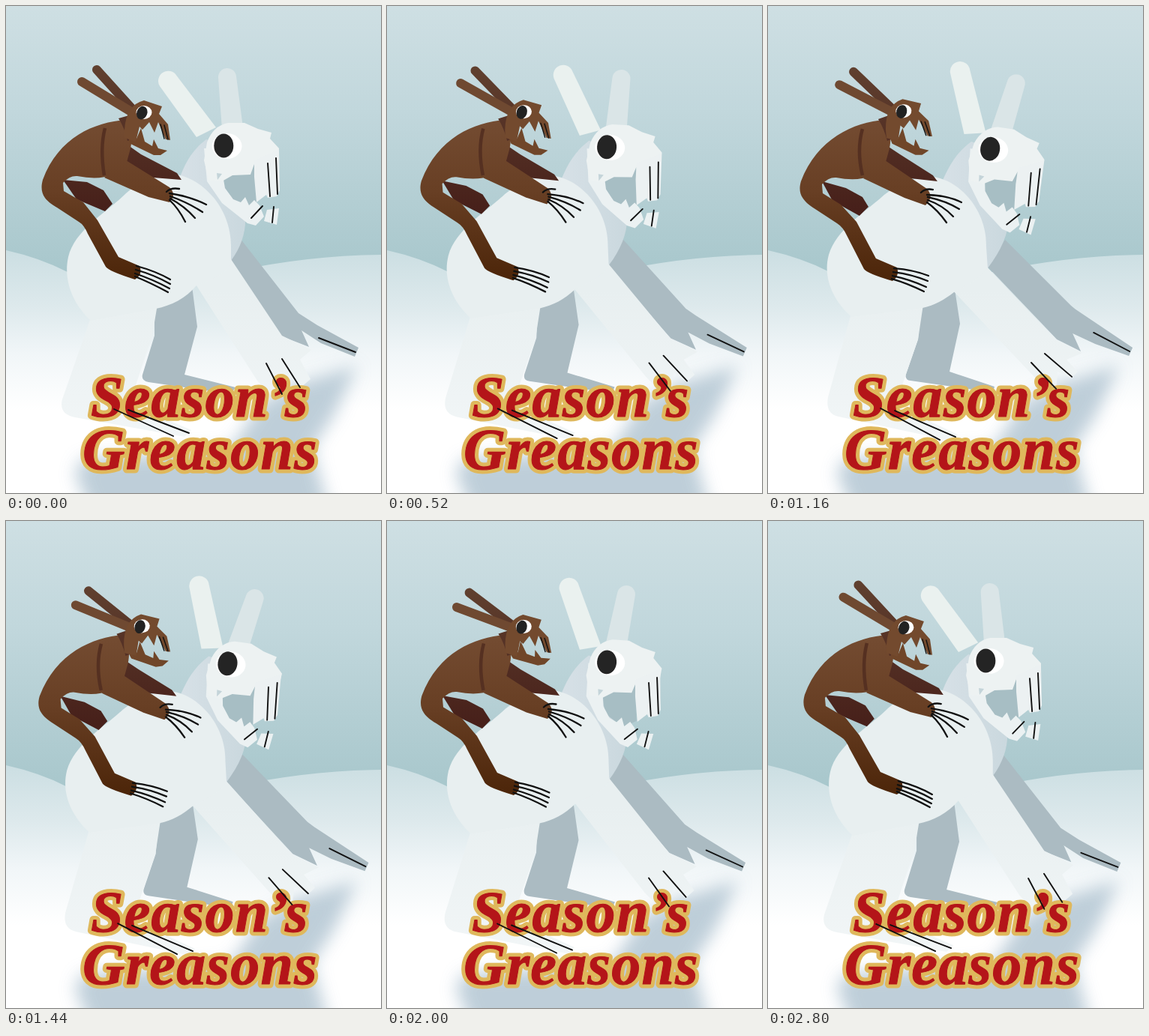
These frames come from a looping animation (500 by 650 pixels, 2840 ms). An HTML page:

```html
<!DOCTYPE html>
<html lang="en">
<head>
<meta charset="utf-8">
<title>Season's Greasons</title>
<style>
html, body { margin: 0; width: 100%; height: 100%; overflow: hidden; background: #fff; }
svg { display: block; width: 500px; height: 650px; }
.claw { fill: none; stroke: #111; stroke-width: 1.9; stroke-linecap: round; }
.fur { stroke-width: 2.3; }
text { font: italic bold 78px "Liberation Serif", serif; letter-spacing: 1.3px; stroke-linejoin: round; }
.edge { fill: #dfb85c; stroke: #dfb85c; stroke-width: 11; }
.face { fill: #b41519; stroke: #b41519; stroke-width: 1; }
</style>
</head>
<body>
<svg viewBox="0 0 500 650">
  <defs>
    <linearGradient id="sky" gradientUnits="userSpaceOnUse" x1="0" y1="0" x2="0" y2="355">
      <stop stop-color="#cedfe3"/><stop offset=".4" stop-color="#c1d7dc"/><stop offset="1" stop-color="#a8c7cc"/>
    </linearGradient>
    <linearGradient id="snow" gradientUnits="userSpaceOnUse" x1="0" y1="325" x2="0" y2="540">
      <stop stop-color="#cbdee2"/><stop offset=".35" stop-color="#dde9ec"/>
      <stop offset=".65" stop-color="#f1f6f8"/><stop offset="1" stop-color="#fff"/>
    </linearGradient>
    <linearGradient id="pelt" gradientUnits="userSpaceOnUse" x1="0" y1="380" x2="0" y2="580">
      <stop stop-color="#e8eff0"/><stop offset="1" stop-color="#f2f6f7"/>
    </linearGradient>
    <linearGradient id="neck" gradientUnits="userSpaceOnUse" x1="235" y1="0" x2="320" y2="0">
      <stop stop-color="#d6e0e6"/><stop offset="1" stop-color="#cad8de"/>
    </linearGradient>
    <linearGradient id="brown" gradientUnits="userSpaceOnUse" x1="0" y1="150" x2="0" y2="365">
      <stop stop-color="#744c32"/><stop offset=".45" stop-color="#683f24"/><stop offset="1" stop-color="#4c2509"/>
    </linearGradient>
    <linearGradient id="dark" gradientUnits="userSpaceOnUse" x1="0" y1="80" x2="0" y2="270">
      <stop stop-color="#60402f"/><stop offset="1" stop-color="#47201a"/>
    </linearGradient>
    <filter id="blur" x="-30%" y="-30%" width="160%" height="160%"><feGaussianBlur stdDeviation="11"/></filter>
  </defs>

  <rect width="500" height="650" fill="url(#sky)"/>
  <path fill="url(#snow)" d="M0 326Q45 336 82 355H300Q400 333 500 332V650H0Z"/>
  <path fill="#b3c6d3" opacity=".85" filter="url(#blur)"
    d="M385 505L468 480L438 545L408 590L435 690H120L92 625L100 605L300 590L340 530Z"/>

  <g id="back"></g>
  <g id="head">
    <g id="farEar"><path fill="#dae5e7" d="M283 96A12 12 0 0 1 307 94L316 162L288 164Z"/></g>
    <g id="nearEar"><path fill="#eaf1ef" d="M205 107A12.8 12.8 0 0 1 227.5 93L280 162L254 175Z"/></g>
    <path fill="#a7bec4" d="M286 222L331 210L335 262L318 272L292 255Z"/>
  </g>
  <g id="jaw">
    <path fill="#ebf1f2" d="M264 190L268 234L288 263L322 290L333 293L344 281L338 266L331 259L324 266L319 255L313 262L303 258L292 243L288 220L296 190Z"/>
    <path fill="#ebf1f2" d="M348 272L364 270L361 292L344 287Z"/>
    <path class="claw" d="M327 283L342 267M357 268L355 289"/>
  </g>
  <g id="skull">
    <path fill="#edf2f2" d="M264 206L268 182Q276 160 296 156L318 156L336 164L354 169L352 177L364 190L360 225L334 232L331 211L326 225L302 226L288 234L270 232Z"/>
    <path fill="#c4d4d9" d="M281 223L288 224L282 232Z"/>
    <g id="muzzle">
      <path fill="#ecf1f2" d="M331 206L364 191L365 246L361 254L349 256L347 252L334 262L331 228Z"/>
      <path class="claw" d="M349 210L352 254M360 203L362 251"/>
    </g>
    <ellipse cx="294.5" cy="187" rx="20" ry="17" fill="#fff"/>
    <ellipse cx="290.3" cy="186.5" rx="13" ry="16" fill="#242424"/>
  </g>
  <g id="front"></g>

  <g id="bHead">
    <g id="bEars" stroke-width="12" stroke-linecap="round">
      <path stroke="url(#dark)" d="M121 85L168 137"/>
      <path stroke="#6f4931" d="M101 101L170 143"/>
    </g>
    <g id="bJaw">
      <path fill="#704629" d="M160 168L174 177L180 163L185 181L195 187L197 178L203 190L215 193L206 199L197 199L166 184Z"/>
    </g>
    <path fill="#734a2e" d="M158 165Q160 132 184 126L208 134L204 144L216 158L219 179L213 178L203 155L198 169L191 155L182 165L178 161L173 181L158 176Z"/>
    <path class="claw" style="stroke-width:1.4" d="M206 158L211 177M211 159L216 178"/>
    <ellipse cx="184" cy="142" rx="10.5" ry="9" fill="#fff"/>
    <ellipse cx="181.5" cy="142.5" rx="7" ry="9" fill="#222" transform="rotate(20 181 142)"/>
  </g>

  <g id="words"></g>
  <g id="claws"></g>
</svg>
<script>
const $ = id => document.getElementById(id);
const LOOP = 2840, PEAK = 960, STEP = 40;

function add(parent, tag, attrs) {
  const el = document.createElementNS('http://www.w3.org/2000/svg', tag);
  for (const k in attrs) el.setAttribute(k, attrs[k]);
  return $(parent).appendChild(el);
}

// Every shape leans between a rear pose and a forward pose.
const shapes = [];
function shape(parent, attrs, rear, fore) {
  const b = fore.match(/-?[\d.]+/g).map(Number);
  shapes.push({ el: add(parent, 'path', attrs), rear, b });
}
const fill = c => ({ fill: c });
const claw = { class: 'claw' }, fur = { class: 'claw fur' };
const GREY = '#abbbc2', PELT = 'url(#pelt)', BROWN = 'url(#brown)', DARK = 'url(#dark)';

// large hare, far side
shape('back', fill(GREY),
  'M312 310L390 410L415 426L470 456L465 468L420 450L394 433L404 455L368 441L290 340Z',
  'M316 312L404 400L410 405L486 456L481 467L436 451L406 437L417 461L385 445L290 345Z');
shape('back', fill(GREY),
  'M198 398L248 374L255 428L238 492L306 509L300 518L190 502Q180 500 182 492L198 440Z',
  'M204 398L249 378L256 424L242 488L302 508L300 516L190 500Q182 499 184 491L200 445Z');
shape('back', fill('url(#neck)'),
  'M267 178C245 195 236 215 228 240L290 345L300 340C316 318 322 295 318 270L300 190Z',
  'M271 181C248 198 239 218 228 244L284 350L293 350C314 322 324 297 320 270L304 192Z');

// large hare, near side
shape('front', fill(PELT),
  'M113 416L75 525Q70 545 92 549L238 575L247 566L165 530L195 440L202 398Z',
  'M111 410L80 522Q76 544 94 548L243 580L253 572L170 532L200 445L207 398Z');
shape('front', fill(PELT),
  'M300 338L368 440L407 459L392 472L406 498L392 510L377 492L370 516L354 520L335 500L252 370Z',
  'M292 348L384 446L419 463L398 472L413 488L404 497L386 488L384 510L372 512L352 492L245 378Z');
shape('front', fill('#e8eff0'),
  'M113 420C90 398 76 368 83 335C92 298 135 275 160 250C180 232 200 224 222 224C262 228 300 270 300 320L300 345C288 362 270 366 254 373C240 390 220 400 200 404Z',
  'M111 415C86 392 73 362 81 332C92 297 130 275 155 252C178 234 200 227 220 228C258 233 292 275 291 320L293 350C280 366 262 374 248 382C235 392 222 400 206 403Z');

// small hare
shape('front', fill(DARK),
  'M76 232L108 235L130 246L142 264L132 274L94 258Z',
  'M72 234L104 243L126 255L134 268L122 280L86 260Z');
shape('front', fill(DARK),
  'M163 186L180 198L228 223L234 232L196 229L160 210Z',
  'M158 186L176 198L220 226L226 234L190 230L156 210Z');
shape('front', fill(BROWN),
  'M160 152C118 155 70 175 49 232C44 250 52 260 68 269L97 288Q104 292 109 304L133 348Q137 354 172 365Q183 358 178 347L150 335L122 286L103 262L77 247L76 236Q85 226 95 227Q140 236 160 212L166 190C170 170 165 155 160 152Z',
  'M156 152C114 155 66 177 44 234C39 251 47 261 63 271L92 290Q100 295 105 306L128 351Q132 357 166 367Q176 360 172 349L144 337L118 288L97 265L73 250L72 238Q81 228 91 229Q136 238 156 212L162 190C166 170 161 155 156 152Z');
shape('front', fill(DARK),
  'M150 150L164 146L168 178L162 180Q158 162 150 150Z',
  'M147 151L161 146L164 178L159 180Q155 164 147 151Z');
shape('front', { fill: 'none', stroke: '#553021', 'stroke-width': 4.5 },
  'M132 163Q125 190 131 226', 'M126 164Q118 192 126 226');
shape('front', fill(BROWN),
  'M160 206L218 242Q228 252 218 262L190 255L131 229Z',
  'M156 206L212 244Q222 255 210 266L182 256L127 230Z');

// lettering
for (const c of ['edge', 'face']) {
  [['Season’s', 113, 548], ['Greasons', 102, 618]].forEach(([s, x, y]) =>
    add('words', 'text', { class: c, x, y }).textContent = s);
}

// claws
shape('claws', claw, 'M417 443L466 462', 'M434 436L482 461');
shape('claws', claw, 'M347 477L368 518M368 471L392 509', 'M351 476L384 511M369 464L405 495');
shape('claws', claw, 'M144 538L223 574M163 539L244 570', 'M150 537L229 579M169 540L250 575');
shape('claws', fur,
  'M214 248Q220 242 231 244M218 250Q245 254 267 265M219 254Q242 262 262 275M219 257Q238 267 252 283M218 259Q230 270 239 288',
  'M204 249Q210 243 220 245M212 252Q240 253 258 262M213 255Q237 260 255 271M213 259Q233 266 247 281M212 262Q226 272 238 289');
shape('claws', fur,
  'M174 347Q200 354 219 365M173 352Q198 359 219 371M172 357Q196 365 218 377M172 361Q192 369 216 382',
  'M168 350Q194 352 214 360M167 355Q192 358 213 367M166 360Q190 365 211 375M165 364Q186 370 208 381');

// angles in degrees at each key time
const times = [0, 520, 840, 1160, 1720, 2280, LOOP];
const turns = {
  head:   [0, 3, 6, 8.5, 7, 0.5, 0],
  jaw:    [0, 2.7, 5.5, 8.5, 8.3, 9, 0],
  ear:    [0, 11.6, 18, 23, 26.3, 7.8, 0],
  muzzle: [0, 0, 0, 0, -3, -4, 0],
  bHead:  [0, -2, -4, -5, -4, -2, 0],
  bEar:   [0, -2, -4, -4, -14, -7.5, 0],
  bJaw:   [0, 0, 0, 0, -14, -6.5, 0]
};

function at(keys, t) {
  let i = 0;
  while (i < times.length - 2 && t >= times[i + 1]) i++;
  const k = (t - times[i]) / (times[i + 1] - times[i]);
  return keys[i] + (keys[i + 1] - keys[i]) * k;
}

function pose(id, turn, cx, cy, dx = 0, dy = 0) {
  $(id).setAttribute('transform', `translate(${dx} ${dy}) rotate(${turn} ${cx} ${cy})`);
}

function draw(t) {
  const lean = 1.13 * (t < PEAK ? t / PEAK : (LOOP - t) / (LOOP - PEAK));
  for (const { el, rear, b } of shapes) {
    let i = 0;
    el.setAttribute('d', rear.replace(/-?[\d.]+/g, a => (+a + (b[i++] - a) * lean).toFixed(2)));
  }
  const r = {};
  for (const k in turns) r[k] = at(turns[k], t);
  const dx = 2.6 * lean, dy = lean;
  pose('head', r.head, 270, 210, dx, dy);
  pose('skull', r.head, 270, 210, dx, dy);
  pose('jaw', r.jaw, 270, 210, dx, dy);
  pose('nearEar', r.ear - r.head, 265, 170);
  pose('farEar', r.ear - r.head, 304, 160);
  pose('muzzle', r.muzzle, 355, 228);
  pose('bHead', r.bHead, 168, 160, -1.5 * lean, -0.5 * lean);
  pose('bEars', r.bEar - r.bHead, 176, 142);
  pose('bJaw', r.bJaw - r.bHead, 165, 172);
}

const start = performance.now();
function tick() {
  const t = (performance.now() - start) % LOOP;
  draw(Math.floor(t / STEP) * STEP);
  requestAnimationFrame(tick);
}
tick();
</script>
</body>
</html>
```
